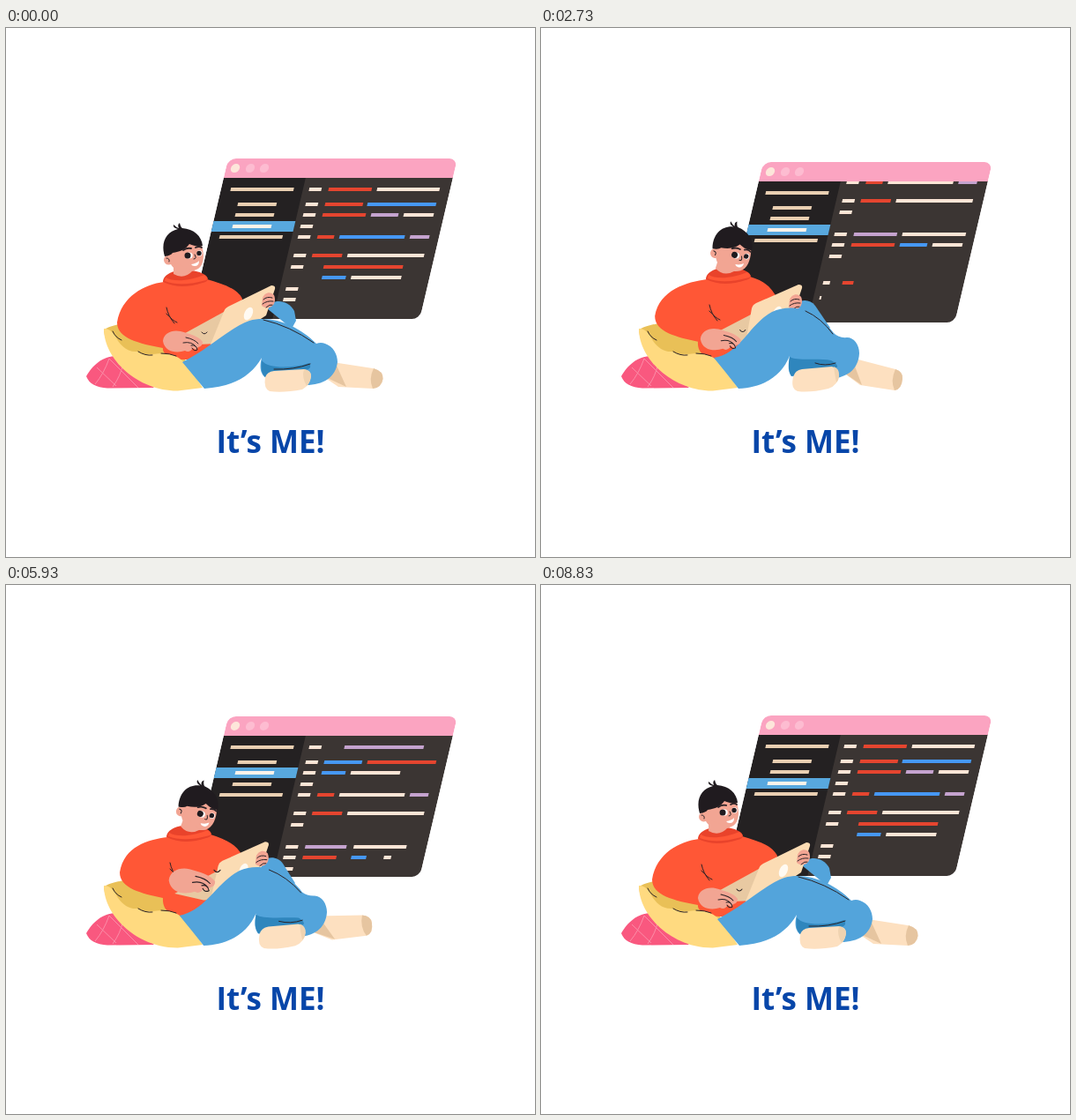
An HTML page for the animation above (8860 ms loop, 600 px wide and 600 px high).

```html
<!DOCTYPE html>
<html lang="en">
<head>
<meta charset="utf-8">
<title>It’s ME!</title>
<style>
  html, body { margin: 0; width: 100%; height: 100%; overflow: hidden; background: #fff; }
  svg { display: block; width: 100vw; height: 100vh; }
  text { font: 700 35px "Open Sans", "Noto Sans", sans-serif; fill: #0746a9; text-anchor: middle; }
  .line { fill: none; stroke: #2a2226; stroke-width: 1; stroke-linecap: round; }
  .skin { fill: #f2a593; }
  .sock { fill: #fde0c0; }
  .toe { fill: #e6c5a0; }
  .jeans { fill: #53a4db; }
  .shade { fill: #2f86bd; }
</style>
</head>
<body>
<svg viewBox="0 0 600 600">
  <defs>
    <clipPath id="frame"><rect width="260" height="182" rx="9"/></clipPath>
    <clipPath id="page"><rect y="22" width="260" height="160"/></clipPath>
  </defs>

  <g id="win">
    <g clip-path="url(#frame)">
      <rect x="90" y="21" width="170" height="161" fill="#3b3533"/>
      <rect y="21" width="93" height="161" fill="#242122"/>
      <rect width="260" height="22" fill="#fba4c1"/>
      <circle cx="10.6" cy="11" r="5" fill="#fde6da"/>
      <circle cx="27.6" cy="11" r="5" fill="#fdbcd1"/>
      <circle cx="43.6" cy="11" r="5" fill="#fdbcd1"/>
      <rect id="band" width="93" height="12" fill="#58a8de"/>
      <g id="menu"></g>
      <g id="code" clip-path="url(#page)"></g>
    </g>
  </g>

  <path fill="#f9587f" d="M91 395C99 380 115 369 130 373L168 408L115 408.500C102 408 94 403 91 395Z"/>
  <path fill="none" stroke="#fb8ea8" stroke-width="1" d="M103 385L125 406M117 375L150 408M101 404Q111 392 117 375M121 407Q130 395 133 380"/>
  <path fill="#e9c057" d="M111 342C120 337 145 330 182 334L205 380L150 380C125 372 112 360 111 342Z"/>

  <path id="torso" fill="#ff5736"/>
  <path id="fold" class="line"/>
  <path id="collar" fill="#e9432b"/>
  <path id="rim" fill="#ff5736"/>
  <path fill="#ffda80" d="M111 341C111 376 150 412 195 411.500L223 408C214 394 206 378 190 371C172 366 162 374 149 367C136 368 128 358 123 348Q117 340 111 341Z"/>
  <path class="line" d="M121 344Q124 351 131 354M150 367Q158 372 166 371M176 369Q186 369 193 372"/>

  <g id="head">
    <path class="skin" d="M181 250C184 238 218 236 222 247C225 256 225 268 218 273C208 279 192 278 187 268Z"/>
    <path class="skin" d="M190 266L190 279Q202 286 212 275Z"/>
    <circle class="skin" cx="184.500" cy="263" r="5.500"/>
    <path class="line" stroke-width=".7" d="M182 261Q186 261 185 265"/>
    <path fill="#201b1f" d="M180 259C175 243 182 231 195 228Q189 227 190 223Q193 226 196 227Q194 223 197 221Q198 226 200 227C213 228 222 236 223 247C216 249 211 246 208 245C204 251 197 254 189 255Q187 258 180 259Z"/>
    <ellipse cx="207.500" cy="258" rx="4.200" ry="3.600" fill="#fff"/>
    <ellipse cx="219.500" cy="255.500" rx="3" ry="3.300" fill="#fff"/>
    <circle cx="206" cy="258" r="3.500" fill="#201b1f"/>
    <circle cx="219" cy="255.500" r="2.700" fill="#201b1f"/>
    <path class="line" style="stroke-width:1.800" d="M201 252Q205 249 210 250M215 249Q219 247 222 249"/>
    <path class="line" d="M214 257Q217 262 213 262"/>
    <path fill="#fff" d="M210 268Q216 267 219 264Q219 270 214 270Q211 270 210 268Z"/>
  </g>

  <path id="backLeg" class="jeans"/>
  <path id="base" fill="#e8c9a2"/>
  <path id="lid" fill="#fbdcb4"/>
  <g id="badge"><ellipse rx="4.500" ry="7.800" fill="#fffaf2" transform="rotate(25)"/></g>
  <g id="grip">
    <path class="skin" d="M-7 -3C-5 -9 2 -11 6 -6C8 -1 7 4 3 7Q-3 10 -8 6Z"/>
    <path class="line" d="M-6 -1Q-2 -5 4 -3M-7 4Q-2 0 5 1M-3 8Q1 4 4 5"/>
  </g>
  <g id="tapFoot">
    <path id="rightFoot" class="sock"/>
    <path id="rightToe" class="toe"/>
    <path id="rightCuff" class="toe"/>
  </g>
  <path id="leg" class="jeans"/>
  <path id="calf" class="shade"/>
  <path id="crease" class="line"/>
  <path id="leftFoot" class="sock"/>
  <path id="leftToe" fill="#f0d3b0"/>
  <g id="hand">
    <path class="skin" d="M-20 0C-19 -9 -10 -13 0 -11C10 -8 20 -6 25 1Q25 6 20 7Q18 12 14 8Q10 14 5 11C-4 14 -18 13 -20 0Z"/>
    <path class="line" d="M6 -4Q16 -2 20 3M3 2Q13 0 18 7M12 5Q18 4 19 10Q15 12 13 8M24 -10Q27 -6 30 -10"/>
  </g>

  <text x="300" y="481.500">It’s ME!</text>
</svg>

<script>
const $ = id => document.getElementById(id);
const TURN = 2215, CYCLE = TURN * 2, BLOCK = 168;
const clamp = x => Math.max(0, Math.min(1, x));
const lerp = (a, b, k) => a + (b - a) * k;
const smooth = x => (x = clamp(x), x * x * (3 - 2 * x));
const easeOut = x => 1 - (1 - clamp(x)) ** 2;

// ---- Editor window ----
const COLORS = { c: '#fbe5d6', r: '#e5452f', b: '#4698f5', l: '#c5a3cf' };
const ROWS = [35, 52, 64, 77, 89, 110, 123, 135, 148, 160, 173];
const BLANK = 7;
const TEXTS = [
  ['r122-171 c177-248', 'r122-165 b170-248', 'r122-171 l177-208 c214-248', '',
   'r122-141 b147-221 l227-249', 'r121-155 c161-248', 'r137-227', 'b138-165 c171-228', '', '', ''],
  ['l140-230', 'b121-164 r170-248', 'b121-148 c154-210', '',
   'r122-141 c147-221 l227-248', 'r121-155 c161-248', '', '', 'l122-171 c177-249',
   'r122-171 b177-208 c214-248', '']
];
const PACE = [{ start: 415, row: 105 }, { start: 580, row: 78 }];

function make(tag, parent, attrs = {}) {
  const el = document.createElementNS('http://www.w3.org/2000/svg', tag);
  for (const k in attrs) el.setAttribute(k, attrs[k]);
  return parent.appendChild(el);
}
const bar = (parent, x, y, width, fill = COLORS.c) =>
  make('rect', parent, { x, y: y - 2, width, height: 4, fill });

const blocks = TEXTS.map((rows, n) => {
  const group = make('g', $('code')), bars = [], { start, row } = PACE[n];
  rows.forEach((text, i) => {
    const parts = text ? text.split(' ') : [];
    if (i !== BLANK) bars.push({ el: bar(group, 100, ROWS[i], 14), w: 14, at: start + i * row * .75 });
    parts.forEach((part, k) => {
      const [x, end] = part.slice(1).split('-').map(Number);
      bars.push({ el: bar(group, x, ROWS[i], end - x, COLORS[part[0]]), w: end - x, at: start + i * row + (k + 1) * 60 });
    });
  });
  return { group, bars };
});

const menu = ROWS.slice(0, 5).map((y, i) =>
  i % 4 ? bar($('menu'), 23, y, 44) : bar($('menu'), 11, y, 71.5));

function drawWindow(t) {
  const top = 150.1 - 3 * Math.cos((t - 1920) / TURN * 2 * Math.PI);
  $('win').setAttribute('transform', `translate(252 ${top}) skewX(-13.2)`);

  const old = Math.floor(t / TURN) % 2, p = t % TURN;
  const scroll = 66 * smooth((p - 150) / 350) + 102 * smooth((p - 700) / 350);
  blocks.forEach(({ group, bars }, n) => {
    group.setAttribute('transform', `translate(0 ${(n === old ? 0 : BLOCK) - scroll})`);
    for (const { el, w, at } of bars)
      el.setAttribute('width', n === old ? w : w * easeOut((p - at) / 300));
  });

  const active = (old === 0) === (p < 300) ? 3 : 2;
  $('band').setAttribute('y', ROWS[active] - 6);
  menu.forEach((el, i) => el.setAttribute('fill', i === active ? '#fff3ea' : '#e9cfb2'));
}

// ---- Figure ----
// time, head x y turn, neck x y, shoulder x y, hand x y, lean
const POSES = [
  [0, 0, 0, 0, 203, 284, 126, 334, 198, 355, 1],
  [100, 0, 0, 0, 203, 284, 126, 334, 198, 355, 1],
  [560, 18, -1, 20, 209, 281, 129, 328, 199, 352, 0],
  [1000, 18, -1, 20, 209, 281, 129, 328, 200, 352, 0],
  [1280, 16, 0, 20, 207, 282, 129, 328, 206, 341, .25],
  [1500, 16, 0, 20, 207, 282, 129, 326, 208, 335, .2],
  [1870, 19, -1, 20, 212, 281, 139, 317, 214, 331, 0],
  [2800, 15, -2, 18, 212, 281, 129, 327, 201, 353, 0],
  [3300, 16, -4, 12, 214, 279, 130, 325, 201, 352, 0],
  [3630, 19, -8, 3, 221, 274, 134, 318, 203, 346, .4],
  [4050, 4, -2, 0, 206, 283, 127, 332, 198, 354, 1],
  [CYCLE, 0, 0, 0, 203, 284, 126, 334, 198, 355, 1]
];

// Each limb: upright path, leaning path
const LIMBS = {
  backLeg: ['M283 320C290 307 304 306 311 315L328 340L300 340Z',
            'M296 318C302 306 320 308 327 321Q329 332 324 341L300 340Z'],
  base: ['M190 350L240 324L246 330L237 356L226 357Z',
         'M196 350L247 322L252 328L238 358L217 359Z'],
  lid: ['M232 357L239 318Q240 314 244 312L292 291Q297 291 296 295L287 322L262 345L242 356Z',
        'M232 359L247 322Q248 318 252 316L301 292Q306 292 305 296L295 326L266 345L243 358Z'],
  rightFoot: ['M342 390L352 374L402 387Q411 390 410 398Q409 410 401 411L362 405Z',
              'M358 394L364 378L416 386Q428 389 427.500 398Q426 408 416 409L377 407Z'],
  rightToe: ['M402 387Q411 390 410 398Q409 410 401 411Q396 400 402 387Z',
             'M417 386Q428 389 427.500 398Q426 408 416 409Q411 398 417 386Z'],
  rightCuff: ['M342 390L355 381L364 405Z', 'M358 394L375 383L386 407Q374 408 358 394Z'],
  leg: ['M196 374C226 370 236 336 262 322C285 311 314 320 332 346Q338 352 347 351C355 351 361 359 361 369C360 388 346 398 324 398L284 395C279 388 281 380 282 372C273 394 253 408 224 409Q210 391 196 374Z',
        'M200 379C230 364 252 341 276 332C302 325 332 338 352 358Q357 356 362 358C371 361 376 370 376 379C374 396 360 405 340 405L295 397C287 392 288 382 290 374C279 393 260 407 225 409Q210 391 200 379Z'],
  calf: ['M282 373C290 378 315 374 329 377C338 382 338 386 332 386L301 388L284 395Q279 387 282 373Z',
         'M290 377C297 387 325 386 344 380C346 384 346 387 339 388L305 389L294 396Q288 391 290 377Z'],
  crease: ['M300 321Q318 329 331 347M311 380Q322 384 334 380',
           'M292 331Q322 338 349 357M304 387Q326 388 345 381'],
  leftFoot: ['M286 396Q288 388 296 387L330 384Q338 386 338 394Q337 405 326 409Q305 414 291 412Q283 409 286 396Z',
             'M294 396Q296 390 304 389L338 387Q346 388 346 395Q345 405 336 410Q315 414 299 412Q292 409 294 396Z'],
  leftToe: ['M332 384Q338 386 338 394Q338 399 335 402Q333 392 332 384Z',
            'M338 387Q346 388 346 395Q345 402 341 406Q335 396 338 387Z']
};
const NUM = /-?\d+(\.\d+)?/g;
const limbs = Object.entries(LIMBS).map(([id, [a, b]]) =>
  ({ el: $(id), a, from: a.match(NUM).map(Number), to: b.match(NUM).map(Number) }));

function poseAt(t) {
  const i = POSES.findIndex(p => p[0] > t), a = POSES[i - 1], b = POSES[i];
  const k = smooth((t - a[0]) / (b[0] - a[0]));
  return a.slice(1).map((v, n) => lerp(v, b[n + 1], k));
}
const shape = (id, d) => $(id).setAttribute('d', d);
const move = (id, x, y, size = 1) =>
  $(id).setAttribute('transform', `translate(${x} ${y}) scale(${size})`);

function drawFigure(t) {
  const [hx, hy, turn, nx, ny, sx, sy, wx, wy, lean] = poseAt(t);
  for (const { el, a, from, to } of limbs) {
    let i = 0;
    el.setAttribute('d', a.replace(NUM, () => lerp(from[i], to[i++], lean).toFixed(2)));
  }
  const tap = 15 * Math.sin(Math.PI * clamp((t - 1050) / 800)) ** 2;
  $('tapFoot').setAttribute('transform', `rotate(${-tap} 356 385)`);
  $('head').setAttribute('transform', `translate(${hx} ${hy}) rotate(${turn} 201 254)`);
  shape('torso', `M${nx - 24} ${ny + 4}C${nx - 46} ${ny + 7} ${sx + 5} ${sy - 30} ${sx} ${sy}
    C${sx} ${sy + 18} ${sx + 25} ${sy + 24} 178 ${sy + 29}C177 370 188 377 210 376L262 345L268 307
    C262 295 ${nx + 42} ${ny + 6} ${nx + 25} ${ny + 1}Z`);
  shape('fold', `M${nx - 21} ${ny + 33}Q${nx - 19} ${ny + 43} ${nx - 12} ${ny + 51}
    M${nx - 21} ${ny + 40}Q${nx - 14} ${ny + 48} ${nx - 9} ${ny + 50}`);
  shape('collar', `M${nx - 25} ${ny + 4}C${nx - 24} ${ny - 12} ${nx + 12} ${ny - 13} ${nx + 24} ${ny - 3}
    Q${nx + 29} ${ny + 3} ${nx + 20} ${ny + 5}C${nx + 4} ${ny + 10} ${nx - 10} ${ny + 11} ${nx - 25} ${ny + 4}Z`);
  shape('rim', `M${nx - 22} ${ny - 1}C${nx - 12} ${ny + 5} ${nx + 8} ${ny + 2} ${nx + 22} ${ny - 4}
    Q${nx + 28} ${ny} ${nx + 24} ${ny + 2}C${nx + 6} ${ny + 7} ${nx - 10} ${ny + 8} ${nx - 23} ${ny + 3}Z`);
  move('badge', lerp(268, 275, lean), lerp(323, 324, lean));
  move('grip', lerp(289, 298, lean), lerp(311, 309, lean));
  move('hand', wx, wy, 1 + (355 - wy) / 120);
}

function draw(now) {
  const t = now % CYCLE;
  drawWindow(t);
  drawFigure(t);
}
const began = performance.now();
function tick() {
  draw(performance.now() - began);
  requestAnimationFrame(tick);
}
tick();
</script>
</body>
</html>
```
